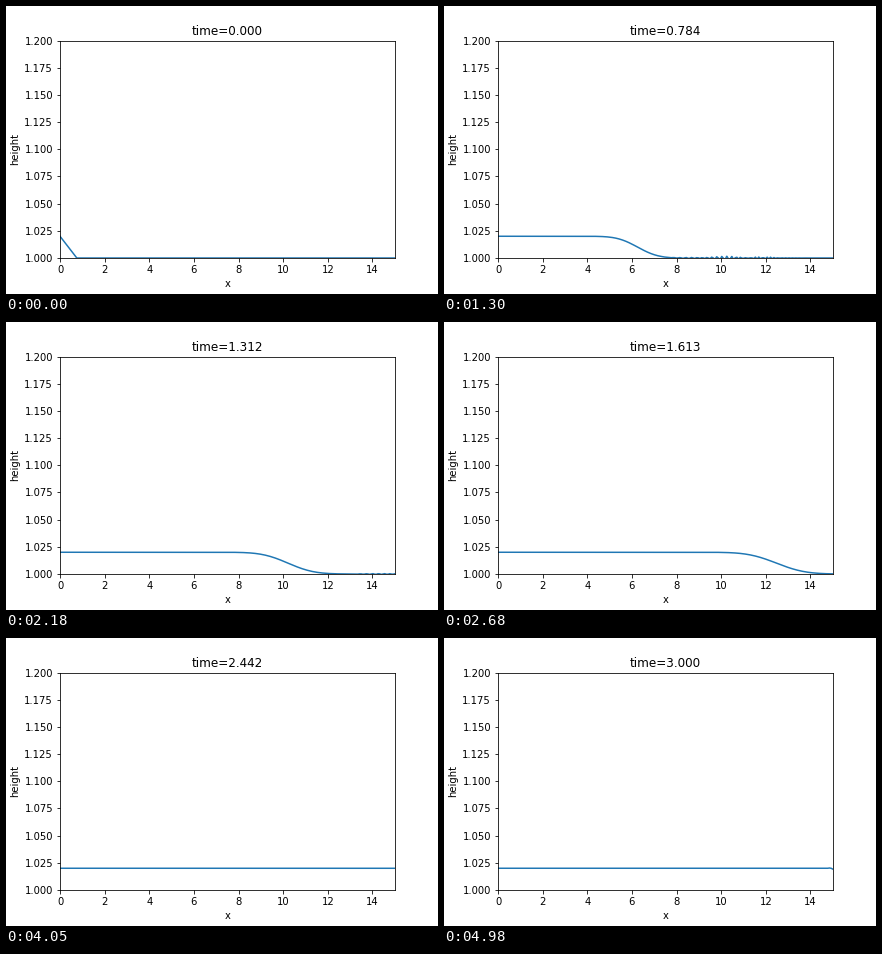
Recreate the animation shown at these times as a matplotlib script. Size 432 px wide and 288 px high, loop 5.01 s.

```python
import math

import matplotlib.pyplot as plt
import numpy as np
from matplotlib.animation import FuncAnimation

STEPS = 200          # distinct states per loop
TICK = 10            # ms per animation tick
LOOP = 5010          # ms
T_END = 3.0
LENGTH = 15.0

SPEED = 7.5          # celerity of the front
DIFFUSION = 0.3
RISE = 0.02          # height of the step
COURANT = 0.704

x = np.linspace(0, LENGTH, STEPS)
dx = x[1] - x[0]
ramp = 10 * dx
dt = COURANT * dx / SPEED
erf = np.vectorize(math.erf)


def ramp_integral(z):
    """Integral of the normal distribution function."""
    cdf = 0.5 * (1 + erf(z / math.sqrt(2)))
    return z * cdf + np.exp(-z * z / 2) / math.sqrt(2 * math.pi)


def front(t):
    """Linear ramp carried downstream and smoothed by diffusion."""
    sigma = math.sqrt(2 * DIFFUSION * t) + 1e-6
    toe = ramp + SPEED * t
    rise = ramp_integral((toe - x) / sigma) - ramp_integral((toe - ramp - x) / sigma)
    return RISE * sigma / ramp * rise


# Short waves of an implicit box scheme: they outrun the front.
k = (np.arange(600) + 0.5) * math.pi / 600
omega = 2 * np.arctan(COURANT * np.tan(k / 2))
band = 1 / (1 + np.exp(-(k / math.pi - 0.58) / 0.03))
weight = 0.0225 / len(k) * np.cos(k / 2) ** 0.6 * np.sin(5 * k) * band
phase = np.outer(x / dx - 5, k)


def ripples(t):
    if t == 0:
        return np.zeros_like(x)
    return np.cos(phase - omega * t / dt) @ weight


def outlet(t):
    """Faint wiggle at the right end late in the run."""
    gain = 0.0008 * max(0.0, (t - 2.45) / 0.55)
    d = LENGTH - x
    return -gain * np.exp(-d / 0.12) * np.cos(math.pi * d / (2 * dx))


times = np.linspace(0, T_END, STEPS)
heights = [1 + front(t) + ripples(t) + outlet(t) for t in times]

plt.rcParams["font.family"] = "DejaVu Sans"
fig = plt.figure(figsize=(6, 4), dpi=72, facecolor="white")
fig.subplots_adjust(left=0.125, right=0.9, bottom=0.125, top=0.88)
ax = fig.add_subplot()
ax.set(xlim=(0, LENGTH), ylim=(1, 1.2), xlabel="x", ylabel="height")
line, = ax.plot(x, heights[0], color="#1f77b4", lw=1.5)
title = ax.set_title("time=0.000")


def state_at(ms):
    """States last 30 and 20 ms in turn."""
    return min(2 * (ms // 50) + (ms % 50 >= 30), STEPS - 1)


def update(tick):
    i = state_at(tick * TICK)
    line.set_ydata(heights[i])
    title.set_text(f"time={times[i]:.3f}")
    return line, title


anim = FuncAnimation(fig, update, frames=LOOP // TICK, interval=TICK,
                     init_func=lambda: update(0), repeat=True, repeat_delay=0)
plt.show()
```
